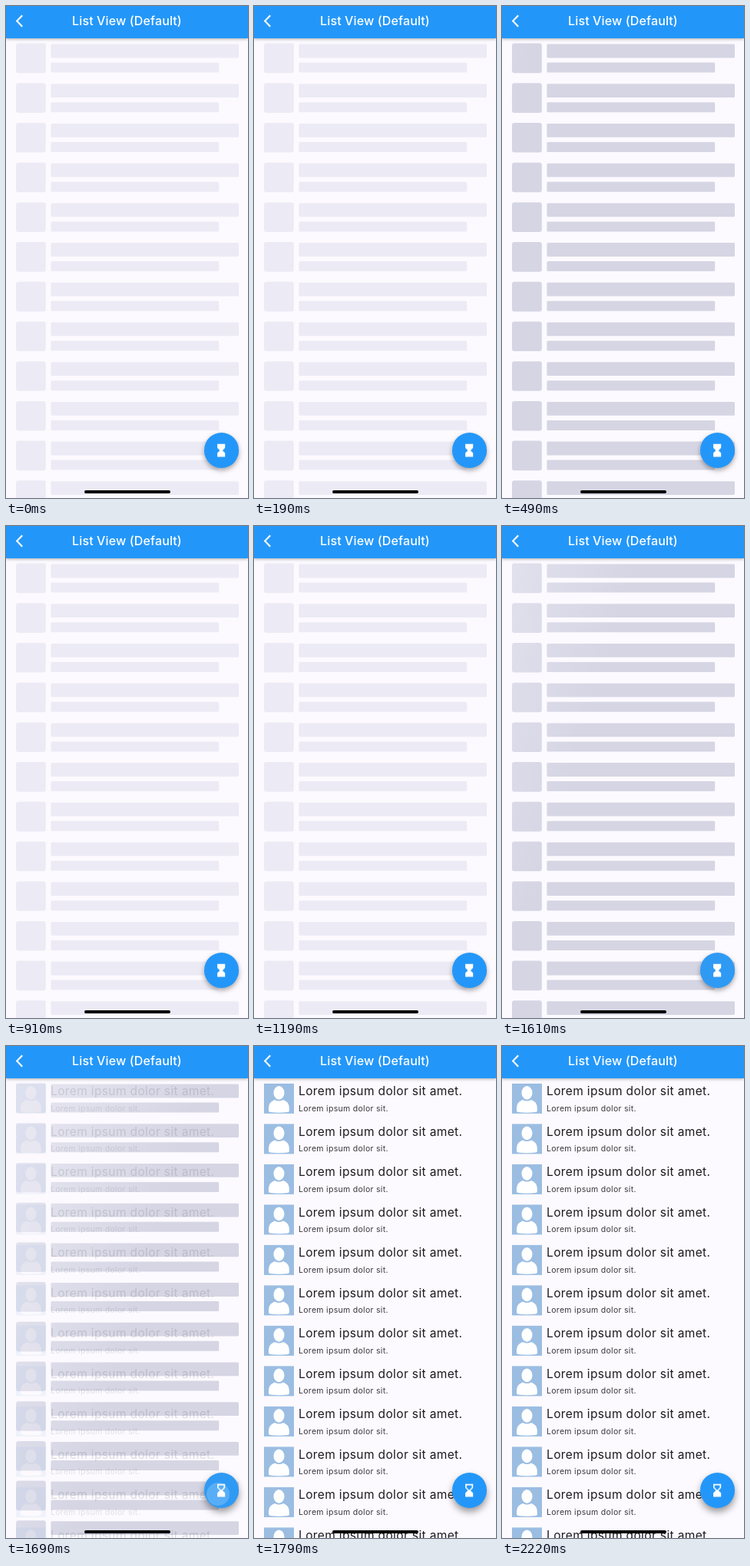
Animation, 315 px wide and 640 px high, one loop 2680 ms. Source, as an HTML page:

```html
<!DOCTYPE html>
<html lang="en">
<head>
<meta charset="utf-8">
<title>List View</title>
<style>
  :root { --blue: #2397f9; --light: #ecebf5; --dark: #d5d5e4; --loop: 2680ms; }
  html, body { margin: 0; width: 100%; height: 100%; overflow: hidden; background: #fcfafe; }
  #stage { position: relative; width: 315px; height: 640px; overflow: hidden; font-family: Inter, sans-serif; }
  #stage > *, .sweep { position: absolute; }
  svg { display: block; overflow: hidden; }

  .skeleton { inset: 0; background: var(--light); clip-path: url(#bars); animation: loading var(--loop) step-end infinite; }
  .sweep {
    left: 0; top: 0; width: 1030px; height: 640px; transform-origin: 0 0;
    background: linear-gradient(90deg, var(--light), var(--dark) 29%, var(--dark) 71%, var(--light));
    animation: sweep var(--loop) linear infinite;
  }
  .list { left: 0; top: 0; animation: reveal var(--loop) step-end infinite; }
  .title { font-size: 15.5px; letter-spacing: .37px; fill: #1c1b1f; }
  .sub { font-size: 10.5px; letter-spacing: .3px; fill: #38373b; }

  header {
    left: 0; top: 0; width: 315px; height: 42px; background: var(--blue); color: #fff;
    font: 500 16px/39px Inter, sans-serif; letter-spacing: .12px; text-align: center;
    box-shadow: 0 1px 4px rgba(0, 0, 0, .32);
  }
  header svg { position: absolute; left: 0; top: 0; }

  .fab {
    left: 257.8px; top: 555.2px; width: 45.4px; height: 45.4px; border-radius: 50%; overflow: hidden;
    background: var(--blue); box-shadow: 0 3px 6px rgba(0, 0, 0, .34);
    animation: press var(--loop) step-end infinite;
  }
  .fab svg { position: absolute; left: 12.6px; top: 12.6px; fill: #fff; }
  .ripple {
    position: absolute; left: 3px; top: 13px; width: 30px; height: 30px; border-radius: 50%;
    background: rgba(255, 255, 255, .2); animation: flash var(--loop) step-end infinite;
  }
  .full { animation: before var(--loop) step-end infinite; }
  .half { animation: after var(--loop) step-end infinite; }
  .home { left: 102px; top: 630px; width: 112px; height: 4px; border-radius: 2px; background: #000; }

  /* The sweep stalls twice while the screen is busy. */
  @keyframes sweep {
    0%, 7.09% { transform: translateX(-1030px) skewX(-16.7deg); }
    18.28%, 22% { transform: translateX(-240px) skewX(-16.7deg); }
    22.01% { transform: translateX(23px) skewX(-16.7deg); }
    28.73%, 44.39% { transform: translateX(495px) skewX(-16.7deg); }
    44.4% { transform: translateX(-1030px) skewX(-16.7deg); }
    56.7%, 60.06% { transform: translateX(-200px) skewX(-16.7deg); }
    60.07% { transform: translateX(-115px) skewX(-16.7deg); }
    63.05%, 100% { transform: translateX(-30px) skewX(-16.7deg); }
  }
  @keyframes loading { 0% { opacity: 1; } 66.78%, 100% { opacity: 0; } }
  @keyframes reveal { 0% { opacity: 0; } 63.05% { opacity: .13; } 66.78%, 100% { opacity: 1; } }
  @keyframes flash { 0% { opacity: 0; } 63.05% { opacity: 1; } 66.78%, 100% { opacity: 0; } }
  @keyframes before { 0% { opacity: 1; } 63.05%, 100% { opacity: 0; } }
  @keyframes after { 0% { opacity: 0; } 63.05%, 100% { opacity: 1; } }
  @keyframes press {
    0% { background: var(--blue); }
    56.7% { background: #2f9af4; }
    63.05% { background: #2f9af4; box-shadow: 0 5px 10px rgba(0, 0, 0, .4); }
    66.78%, 100% { background: var(--blue); }
  }
</style>
</head>
<body>
<div id="stage">
  <svg width="0" height="0"><clipPath id="bars"></clipPath></svg>
  <div class="skeleton"><div class="sweep"></div></div>
  <svg class="list" width="315" height="640"></svg>

  <header>
    List View (Default)
    <svg width="42" height="42" fill="none" stroke="#fff" stroke-width="2.1"><path d="M21.2 12.3 14.2 19.5 21.2 26.7"/></svg>
  </header>

  <div class="fab">
    <div class="ripple"></div>
    <svg width="20.2" height="20.2" viewBox="0 0 24 24">
      <path class="full" d="M6 2v6l4 4-4 4v6h12v-6l-4-4 4-4V2z"/>
      <path class="half" d="M18 22v-6l-4-4 4-4V2H6v6l4 4-4 4v6zM8 7.5V4h8v3.5l-4 4z" fill-rule="evenodd"/>
    </svg>
  </div>
  <div class="home"></div>
</div>

<script>
  const ROWS = 12;
  const rows = draw => Array.from({ length: ROWS }, (_, i) => draw(i)).join('');
  const bar = (x, y, w, h, r) => `<rect x="${x}" y="${y}" width="${w}" height="${h}" rx="${r}"/>`;

  document.querySelector('#bars').innerHTML = rows(i => {
    const y = 48.6 + i * 51.7;
    return bar(13, y, 38.8, 38.6, 3) + bar(58.4, y + 1, 244.6, 17.8, 1.5) + bar(58.4, y + 25, 218.8, 13, 1.5);
  });

  document.querySelector('.list').innerHTML = rows(i => `
    <g transform="translate(13 ${48.9 + i * 52.5})">
      <rect width="39" height="39" fill="#9bbde2"/>
      <g fill="#fff">
        <ellipse cx="19.5" cy="12" rx="7" ry="8.8"/>
        <path d="M6 35C6 26 8 23.5 14 21Q19.5 24 25 21C31 23.5 33 26 33 35Q33 36.5 31 37Q19.5 38.6 8 37Q6 36.5 6 35Z"/>
      </g>
      <text class="title" x="45" y="15.2">Lorem ipsum dolor sit amet.</text>
      <text class="sub" x="45" y="36">Lorem ipsum dolor sit.</text>
    </g>`);
</script>
</body>
</html>
```
